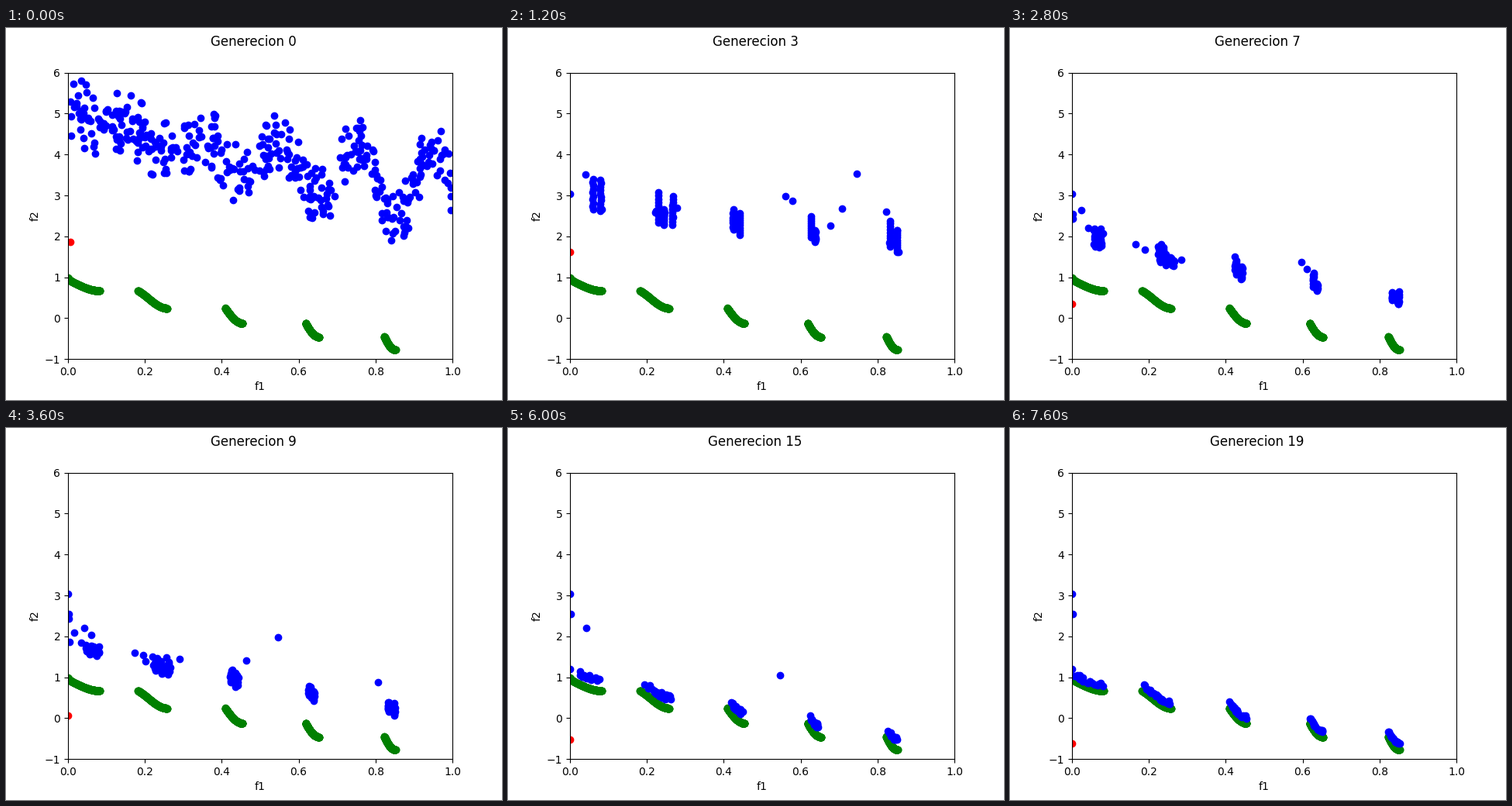
A matplotlib script for the animation above (8000 ms loop, 640 px wide and 480 px high).

```python
import numpy as np
import matplotlib.pyplot as plt
from matplotlib.animation import FuncAnimation

FRAMES, INTERVAL = 20, 400
POPULATION = 400

# Pareto-optimal f1 ranges of ZDT3, and where the swarm gathers above each.
SEGMENTS = [(0, 0.083), (0.182, 0.258), (0.409, 0.454),
            (0.618, 0.653), (0.823, 0.852)]
COLUMNS = [(0.060, 0.080), (0.230, 0.245, 0.268), (0.424, 0.442),
           (0.627, 0.638), (0.833, 0.851)]

# Long-lived individuals: f1, f2, first and last generation.
ELITES = [(0, 3.03, 2, 19), (0.003, 2.54, 4, 19), (0.003, 2.43, 4, 13),
          (0.043, 2.20, 5, 16), (0.060, 2.03, 5, 13), (0.060, 1.75, 8, 13),
          (0.035, 1.85, 8, 13), (0.174, 1.59, 8, 13), (0.196, 1.54, 8, 13),
          (0.202, 1.39, 8, 13), (0.257, 1.48, 5, 13), (0.001, 1.20, 14, 19)]


def zdt3(f1, g):
    return g - np.sqrt(f1 * g) - f1 * np.sin(10 * np.pi * f1)


def best_f2(gen):
    return np.interp(gen, [0, 2, 4, 5, 9, 12, 16, 19],
                     [1.86, 1.83, 1.41, 0.63, 0.06, -0.31, -0.60, -0.61])


def base_g(gen):
    return np.interp(gen, [1, 3, 5, 9, 12, 15, 19],
                     [4.2, 3.05, 2.35, 1.93, 1.52, 1.23, 1.10])


def floor_g(f1, gen):
    """Lowest g reached so far; large f1 lags behind small f1."""
    base = base_g(gen)
    slope = 0.34 * (base - 1) ** 2 + 0.15
    return np.minimum(base + slope * f1, 4.65)


def initial_population(rng):
    f1 = rng.uniform(0.002, 1, POPULATION)
    g = np.clip(rng.normal(5.5, 0.48, POPULATION), 4.65, 6.3)
    return f1, zdt3(f1, g)


def evolved_population(gen, rng):
    spread = 0.4 * (base_g(gen) - 1) + 0.08
    f1_parts, g_parts = [], []

    # Columns slowly widen until they cover their front segment.
    settle = (gen / (FRAMES - 1)) ** 2
    for (left, right), columns in zip(SEGMENTS, COLUMNS):
        for column in columns:
            f1 = column + settle * (rng.uniform(left, right, 10) - column)
            height = spread * rng.uniform(0.4, 1)
            f1_parts.append(f1)
            g_parts.append(floor_g(f1, gen) + np.linspace(0, height, 10))

    count = round(POPULATION * np.exp(-1.3 * gen)) + 10 - gen // 2
    f1 = 0.88 * rng.uniform(0, 1, count) ** 1.4
    f1_parts.append(f1)
    g_parts.append(floor_g(f1, gen) + rng.exponential(0.4 * spread, count))

    f1, g = np.concatenate(f1_parts), np.concatenate(g_parts)
    elites = [(x, y) for x, y, first, last in ELITES if first <= gen <= last]
    elites = np.array(elites).reshape(-1, 2)
    return np.append(f1, elites[:, 0]), np.append(zdt3(f1, g), elites[:, 1])


def population_at(gen):
    rng = np.random.default_rng(gen + 7)
    if gen == 0:
        f1, f2 = initial_population(rng)
    else:
        f1, f2 = evolved_population(gen, rng)
    return f1, np.maximum(f2, best_f2(gen))


fig, ax = plt.subplots(figsize=(6.4, 4.8), dpi=100)
ax.set(xlim=(0, 1), ylim=(-1, 6), xlabel="f1", ylabel="f2")
title = fig.suptitle("Generecion 0", x=0.4985, y=0.982)

front = np.concatenate([np.linspace(a, b, 200) for a, b in SEGMENTS])
ax.plot(front, zdt3(front, 1), "go")
swarm, = ax.plot([], [], "bo")
ideal, = ax.plot([], [], "ro")


def update(gen):
    f1, f2 = population_at(gen)
    title.set_text(f"Generecion {gen}")
    swarm.set_data(f1, f2)
    ideal.set_data([f1.min()], [best_f2(gen)])
    return title, swarm, ideal


anim = FuncAnimation(fig, update, frames=FRAMES, interval=INTERVAL,
                     repeat=True, repeat_delay=0)
plt.show()
```
